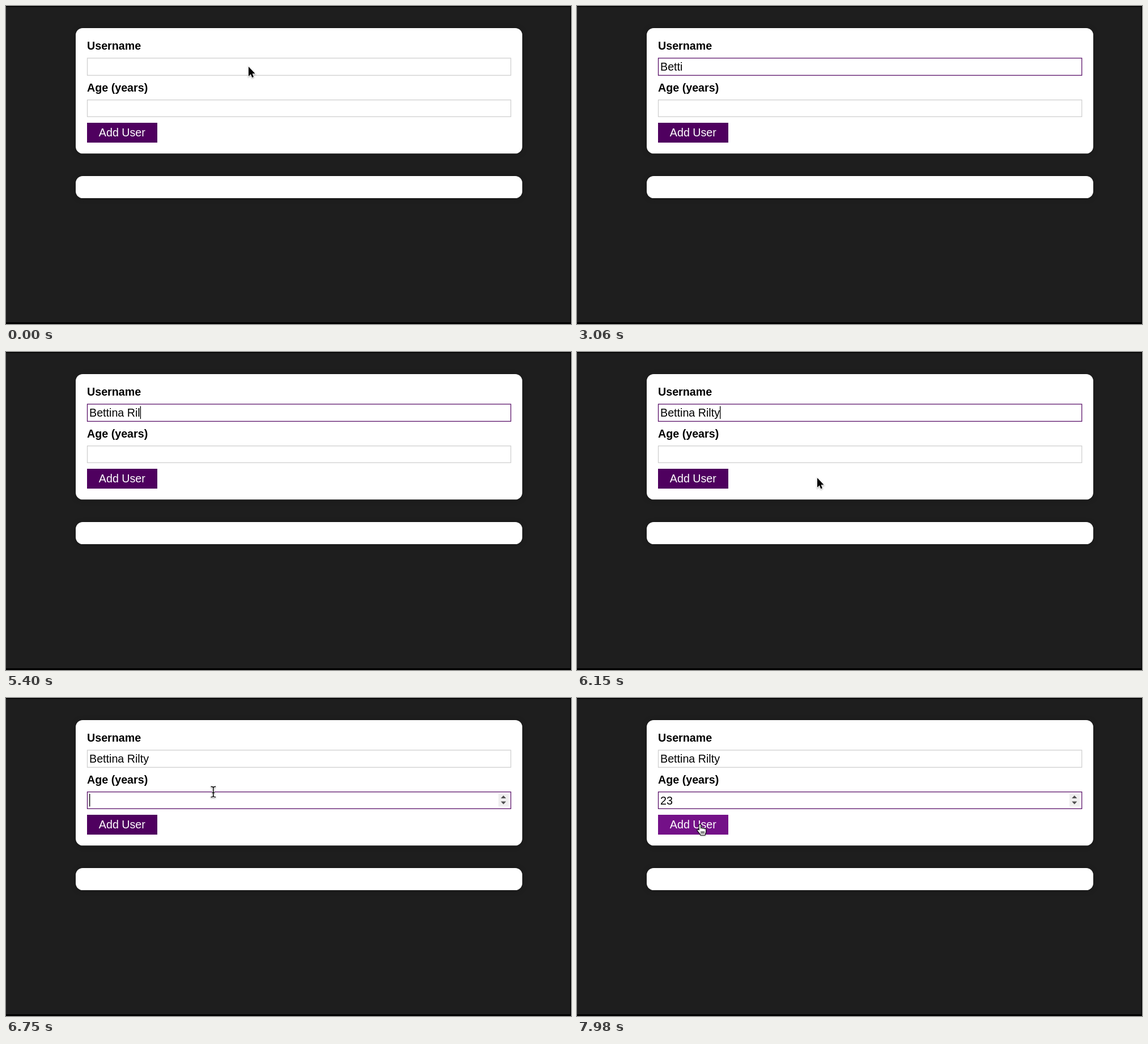
These frames come from a looping animation (997 px wide and 561 px high, 8 s). An HTML page:

```html
<!DOCTYPE html>
<html lang="en">
<head>
<meta charset="utf-8">
<title>Add User</title>
<style>
  html, body { margin: 0; width: 100%; height: 100%; overflow: hidden; background: #1e1e1e; }
  svg { display: block; width: 100%; height: 100%; }
  text { font: 19.7px "Liberation Sans", Arial, sans-serif; white-space: pre; }
  .label { font-weight: bold; }
  .card { fill: #fff; filter: drop-shadow(0 1px 4px rgba(0, 0, 0, .25)); }
  .field { fill: #fff; stroke-width: 1.2; }
  .cursor { filter: drop-shadow(0 1px 1px rgba(0, 0, 0, .35)); }
</style>
</head>
<body>
<svg viewBox="0 0 997 561">
  <rect width="997" height="561" fill="#1e1e1e"/>
  <path d="M0 0H997V561H0V558H995.8V1.5H0Z"/>
  <rect class="card" x="123" y="39" width="788" height="221.3" rx="12.3"/>
  <rect class="card" x="123" y="300" width="788" height="39" rx="12.3"/>

  <text class="label" x="143" y="77">Username</text>
  <rect class="field" id="nameBox" x="143.5" y="92" width="747.3" height="30.3"/>
  <text id="name" x="147" y="113.8"></text>

  <text class="label" x="143" y="151">Age (years)</text>
  <rect class="field" id="ageBox" x="143.5" y="165.7" width="747.3" height="29.6"/>
  <text id="age" x="147" y="187.5"></text>
  <g id="spinner">
    <rect x="869" y="169" width="18" height="22.5" fill="#efefef"/>
    <path d="M873.2 177L877.8 172L882.4 177ZM873.2 182.6H882.4L877.8 187.6Z" fill="#505050"/>
  </g>
  <rect id="caret" width="1.3"/>

  <rect id="button" x="143" y="206" width="124" height="35"/>
  <text x="163.8" y="230.3" fill="#fff">Add User</text>

  <g class="cursor" id="arrow">
    <path d="M0 0V17L3.9 13.3L6.3 19.2L9 18.1L6.6 12.3H11.6Z" stroke="#fff" stroke-width="1.8" paint-order="stroke"/>
  </g>
  <g class="cursor" id="beam" fill="none">
    <path id="beamLine" d="M-4.2-9.3Q0-9.3 0-7Q0-9.3 4.2-9.3M0-7V7M-4.2 9.3Q0 9.3 0 7Q0 9.3 4.2 9.3M-2.2 1.8H2.2" stroke="#fff" stroke-width="3"/>
    <use href="#beamLine"/>
    <path d="M-4.2-9.3Q0-9.3 0-7Q0-9.3 4.2-9.3M0-7V7M-4.2 9.3Q0 9.3 0 7Q0 9.3 4.2 9.3M-2.2 1.8H2.2" stroke="#000" stroke-width="1.5"/>
  </g>
  <g class="cursor" id="hand" stroke="#000" stroke-width="1.1" stroke-linejoin="round">
    <path d="M-1.7 9V.8a1.6 1.6 0 0 1 3.3 0V6.5c.3-1.6 3.2-1.4 3.3.3c.5-1.2 2.9-.9 3.1.6c.8-1 2.6-.5 2.7 1V12c0 2-1.5 3.5-1.6 6.5H1C.8 16-2.5 14-4.6 10.5C-5.5 8.6-3.3 7.6-1.7 9.5Z" fill="#fff"/>
    <path d="M2.2 11.5V16M4.6 11.5V16M7 11.5V16" fill="none"/>
  </g>
</svg>
<script>
const LOOP = 8000, BLINK = 450;
const $ = id => document.getElementById(id);

const name = { focus: 1110, text: 'Bettina Rilty', top: 95.5,
  keys: [2100, 2220, 2340, 2460, 2610, 3570, 3750, 3960, 4950, 5160, 5400, 5490, 5910] };
const age = { focus: 6570, text: '23', top: 169, keys: [7320, 7530] };

// time, x, y of the pointer's hot spot
const path = [
  [0, 428, 107], [780, 428, 107], [900, 423.5, 101],
  [6060, 423.5, 101], [6150, 424, 222], [6240, 420, 227], [6390, 385, 194],
  [6540, 368, 178], [6750, 365.8, 165.5], [7380, 365.8, 165.5],
  [7590, 305, 218], [7740, 248, 233], [7950, 217, 223.5], [LOOP, 217, 223.5]
];

function pointer(t) {
  const i = path.findIndex(p => p[0] > t);
  const [t0, x0, y0] = path[i - 1], [t1, x1, y1] = path[i];
  const k = (t - t0) / (t1 - t0);
  return [x0 + (x1 - x0) * k, y0 + (y1 - y0) * k];
}

const show = (id, on) => $(id).setAttribute('display', on ? 'inline' : 'none');
const paint = (id, attr, color) => $(id).setAttribute(attr, color);

function type(id, field, t) {
  const count = field.keys.filter(k => k <= t).length;
  $(id).textContent = field.text.slice(0, count);
  return count ? field.keys[count - 1] : field.focus;
}

function draw(t) {
  const [x, y] = pointer(t);
  const inField = (top, bottom) => x > 143 && x < 891 && y >= top && y <= bottom;
  const overAge = inField(165, 196);
  const overButton = x > 143 && x < 267 && y > 206 && y < 241;
  const visible = t < 2100 || (t >= 6060 && t < 7320) || t >= 7380;

  // The arrow stays until the pointer first moves.
  const shape = overButton ? 'hand'
    : t >= 840 && (overAge || inField(91, 123)) ? 'beam' : 'arrow';
  for (const id of ['arrow', 'beam', 'hand']) show(id, visible && id === shape);
  $(shape).setAttribute('transform', `translate(${x} ${y})`);

  const onAge = t >= age.focus, onName = t >= 1080 && !onAge;
  paint('nameBox', 'stroke', onName ? '#4f005f' : '#ccc');
  paint('ageBox', 'stroke', onAge ? '#4f005f' : '#ccc');
  paint('button', 'fill', overButton ? '#741188' : '#4f005f');
  show('spinner', onAge || (visible && overAge));

  const lastName = type('name', name, t), lastAge = type('age', age, t);
  const field = onAge ? age : name, last = onAge ? lastAge : lastName;
  const lit = t >= last && (t - last) % (2 * BLINK) < BLINK;
  const caret = $('caret');
  show('caret', lit);
  caret.setAttribute('x', 147 + $(onAge ? 'age' : 'name').getComputedTextLength());
  caret.setAttribute('y', field.top);
  caret.setAttribute('height', 22.5);
}

const start = performance.now();
function tick() {
  draw((performance.now() - start) % LOOP);
  requestAnimationFrame(tick);
}
tick();
</script>
</body>
</html>
```
